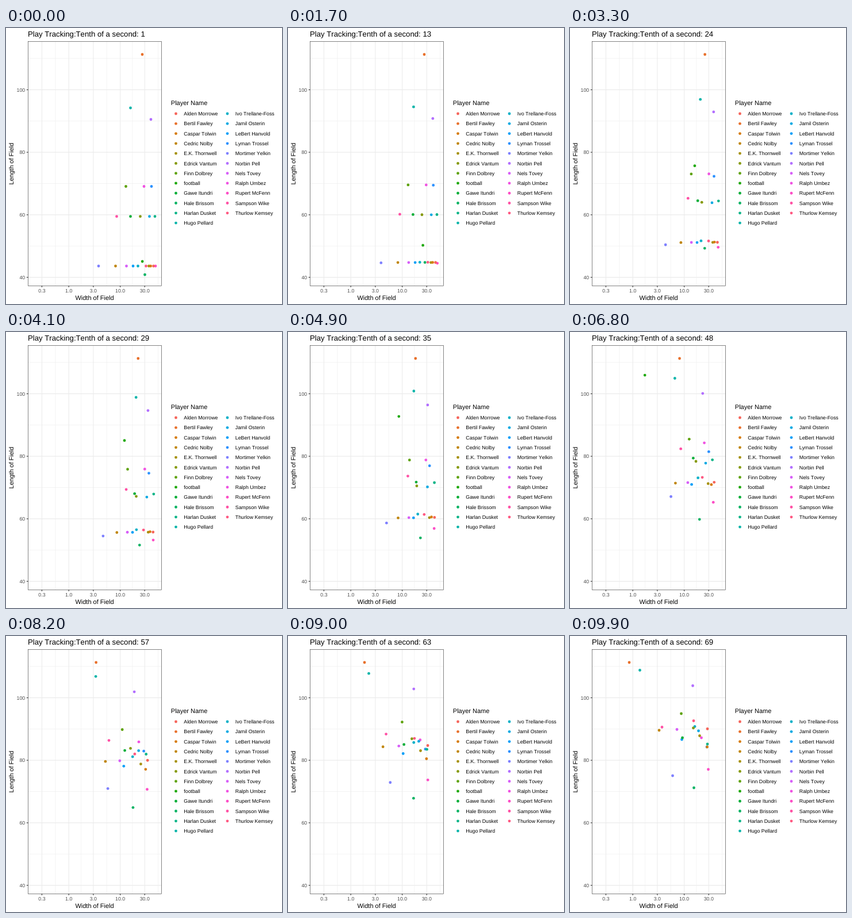
An HTML page that plays this animation: 480 px wide and 480 px high, repeating every 10 s.

```html
<!DOCTYPE html>
<html lang="en">
<head>
<meta charset="utf-8">
<title>Play Tracking</title>
<style>
  html, body { margin: 0; width: 100%; height: 100%; overflow: hidden; background: #fff; }
  svg { display: block; width: 480px; height: 480px; }
  text {
    font: 8.8px "Liberation Sans", Arial, Helvetica, sans-serif;
    font-kerning: none; text-rendering: geometricPrecision; white-space: pre;
  }
  .title { font-size: 13.2px; }
  .head { font-size: 11px; }
  .tick { fill: #4d4d4d; }
</style>
</head>
<body>
<svg id="stage" viewBox="0 0 480 480"></svg>
<script>
const LOOP = 10000, STEP = 100, LAST = 99, TENTHS = 69;
const GRID = '#ebebeb', INK = '#333';
const left = 38.5, roof = 23.5, right = 270.5, floor = 448.3;
const stage = document.getElementById('stage');

function add(tag, attrs, content) {
  const el = document.createElementNS('http://www.w3.org/2000/svg', tag);
  for (const key in attrs) el.setAttribute(key, attrs[key]);
  if (content !== undefined) el.textContent = content;
  return stage.appendChild(el);
}
const line = (x1, y1, x2, y2, stroke, width) =>
  add('line', { x1, y1, x2, y2, stroke, 'stroke-width': width });
const label = (x, y, content, attrs) => add('text', { x, y, ...attrs }, content);
const dot = (cx, cy, fill) => add('circle', { cx, cy, r: 2.4, fill });

// Field units to pixels; the width axis is logarithmic
const toX = width => 109.2 + 89.4 * Math.log10(width);
const toY = length => 433.6 - 5.437 * (length - 40);

// Evenly spaced hues in polar LUV, lightness 65 and chroma 100, slightly darkened
function hue(i, count) {
  const L = 65, C = 100, a = (15 + 360 * i / count) * Math.PI / 180;
  const u = C * Math.cos(a) / (13 * L) + 0.1978, v = C * Math.sin(a) / (13 * L) + 0.4683;
  const Y = ((L + 16) / 116) ** 3, X = Y * 9 * u / (4 * v), Z = Y * (12 - 3 * u - 20 * v) / (4 * v);
  const rgb = [
    3.2405 * X - 1.5371 * Y - 0.4985 * Z,
    -0.9693 * X + 1.876 * Y + 0.0416 * Z,
    0.0556 * X - 0.204 * Y + 1.0572 * Z
  ].map(c => {
    const g = c <= 0.0031308 ? 12.92 * c : 1.055 * c ** (1 / 2.4) - 0.055;
    return Math.round(255 * Math.min(1, Math.max(0.08, g)) ** 1.22);
  });
  return `rgb(${rgb})`;
}

// Where each group lines up, and when it starts to run
const KICKER = { y: 429, start: 0 };
const COVER = { y: 414, start: 20.5 };
const FRONT = { y: 327.7, start: 23 };
const WEDGE = { y: 275.5, start: 23 };
const deep = y => ({ y, start: 23 });
const BRAKE_AT = 64;

// Zero before the moment, then rising steadily, with a soft corner
const ramp = t => 5 * Math.log(1 + Math.exp(t / 5));

const movers = [];

// Run from the line to a spot; bend bows the path sideways, brake slows the late part
function runner(name, group, fromX, toX, toY, bend = 0, brake = 0) {
  const gone = n => ramp(n - group.start) - brake * ramp(n - BRAKE_AT);
  const first = gone(0), total = gone(LAST) - first;
  movers.push({
    name,
    at(n) {
      const p = (gone(n) - first) / total;
      return [fromX + (toX - fromX) * p + 4 * p * (1 - p) * bend, group.y + (toY - group.y) * p];
    }
  });
}

// The kicked ball loses speed in the air and leaves over the near sideline
function ball(name) {
  const slowing = (t, rate) => 1 - Math.exp(-rate * t);
  movers.push({
    name,
    at(n) {
      const t = Math.max(0, n - 14.4);
      const width = 27 - 47.9 * slowing(t, 0.014);
      return width > 0.15 ? [toX(width), 406 - 450 * slowing(t, 0.0248)] : null;
    }
  });
}

runner('Alden Morrowe', COVER, 256.5, 239, 161.5, 5);
runner('Bertil Fawley', deep(46), 237, 103, 46, 34);
runner('Caspar Tolwin', COVER, 251.5, 238.5, 193, 3.5, 0.3);
runner('Cedric Nolby', COVER, 190.5, 155, 164, 15);
runner('E.K. Thornwell', COVER, 248.5, 225.5, 173.5, 6.5, 0.1);
runner('Edrick Vantum', FRONT, 233.5, 214.5, 160, -3, 0.1);
runner('Finn Dolbrey', WEDGE, 208.5, 193.5, 135, 9, 0.2);
ball('football');
runner('Gawe Itundri', FRONT, 216.5, 195.5, 177, 16, 0.5);
runner('Hale Brissom', KICKER, 241.5, 215.5, 264, 0, -0.3);
runner('Harlan Dusket', FRONT, 259, 239, 188, 5, 0.6);
runner('Hugo Pellard', deep(139), 216.5, 121.5, 59.5, 46, 0.55);
runner('Ivo Trellane-Foss', COVER, 229.5, 217, 157.5, 1, 0.1);
runner('Jamil Osterin', FRONT, 249.5, 223.5, 165, 2.5, 0.1);
runner('LeBert Hanvold', COVER, 221, 194.5, 180, 8, 0.15);
runner('Lyman Trossel', WEDGE, 253, 238, 193, 1, 0.75);
runner('Mortimer Yelkin', COVER, 161, 178.5, 243, 2, 0.55);
runner('Norbin Pell', deep(159), 252, 213.5, 86.5, 8, 0.5);
runner('Nels Tovey', COVER, 209.5, 186, 162.5, 10);
runner('Ralph Umbez', WEDGE, 240, 228.5, 177, 6, 0.8);
runner('Rupert McFenn', COVER, 260, 240.5, 232, 2, 0.2);
runner('Sampson Wike', FRONT, 192.5, 160, 158.5, 31, 0.55);
runner('Thurlow Kemsey', COVER, 243.5, 215, 147.5, 4);

const widths = ['0.3', '1.0', '3.0', '10.0', '30.0'], lengths = [40, 60, 80, 100];

// Thin grid lines lie halfway between the labelled ones
widths.forEach((w, i) => {
  const x = (toX(w) + toX(widths[i + 1] || 100)) / 2;
  line(x, roof, x, floor, GRID, 0.53);
});
lengths.forEach(l => line(left, toY(l + 10), right, toY(l + 10), GRID, 0.53));
widths.forEach(w => line(toX(w), roof, toX(w), floor, GRID, 1.07));
lengths.forEach(l => line(left, toY(l), right, toY(l), GRID, 1.07));

movers.forEach((m, i) => { m.color = hue(i, movers.length); });
[...movers].reverse().forEach(m => { m.el = dot(0, 0, m.color); });

add('rect', { x: left, y: roof, width: right - left, height: floor - roof, fill: 'none', stroke: INK, 'stroke-width': 0.6 });

widths.forEach(w => {
  line(toX(w), floor, toX(w), floor + 2.75, INK, 1.07);
  label(toX(w), 460, w, { class: 'tick', 'text-anchor': 'middle' });
});
lengths.forEach(l => {
  line(left - 2.75, toY(l), left, toY(l), INK, 1.07);
  label(33.2, toY(l) + 3.2, l, { class: 'tick', 'text-anchor': 'end' });
});
label(154, 473, 'Width of Field', { class: 'head', 'text-anchor': 'middle' });
label(0, 0, 'Length of Field', { class: 'head', 'text-anchor': 'middle', transform: 'translate(12.8 236) rotate(-90)' });

label(286.8, 134, 'Player Name', { class: 'head' });
movers.forEach((m, i) => {
  const shift = i < 12 ? 0 : 89.5, y = 149 + 17.28 * (i % 12);
  dot(295.5 + shift, y, m.color);
  label(309.3 + shift, y + 3.1, m.name);
});

const title = label(38, 15, '', { class: 'title' });
const begin = performance.now();
let shown = -1;

function draw(n) {
  title.textContent = 'Play Tracking:Tenth of a second: ' + Math.round(1 + n * (TENTHS - 1) / LAST);
  for (const { el, at } of movers) {
    const spot = at(n);
    el.setAttribute('visibility', spot ? 'visible' : 'hidden');
    if (spot) el.setAttribute('transform', `translate(${spot})`);
  }
}

function tick() {
  const n = Math.floor((performance.now() - begin) % LOOP / STEP);
  if (n !== shown) draw(shown = n);
  requestAnimationFrame(tick);
}
tick();
</script>
</body>
</html>
```
